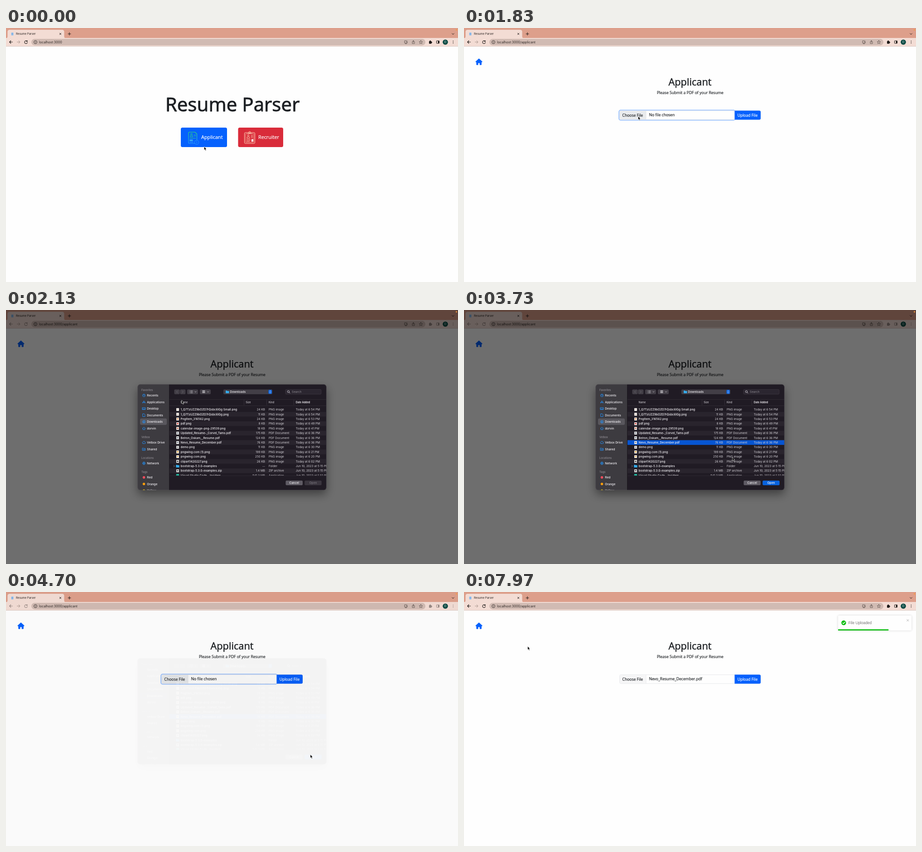
Write an HTML page that moves like this. It is 998 by 561 pixels and loops after 8 s.

```html
<!DOCTYPE html>
<html lang="en">
<head>
<meta charset="utf-8">
<title>Resume Parser</title>
<style>
  html, body { margin: 0; width: 100%; height: 100%; overflow: hidden; background: #fefefe; }
  svg { display: block; width: 100%; height: 100%; }
  text { font-family: Inter, Roboto, sans-serif; white-space: pre; }
  .round { font-family: "Open Sans", "Noto Sans", sans-serif; stroke-width: .022em; stroke-linejoin: round; }
  .round[fill="#1d2024"] { stroke: #1d2024; }
  .round[fill="#fff"] { stroke: #fff; }
  .plain { font-family: "Liberation Sans", Arial, sans-serif; }
  .line { fill: none; stroke-linecap: round; stroke-linejoin: round; }
  .idle { opacity: .42; }
  .resting .tint { fill: #3c3c3e; stroke: #3c3c3e; }
</style>
</head>
<body>
<svg id="stage" viewBox="0 0 998 561" xmlns="http://www.w3.org/2000/svg"></svg>
<script>
const LOOP = 8000;
const INK = '#1d2024', BLUE = '#0561fd', DARK_BLUE = '#0a56d4', RED = '#d92b3a';
const stage = document.getElementById('stage');

// Markup helpers; text is placed by the middle of its capitals.
const text = (x, y, s, size, fill = INK, more = '') =>
  `<text x="${x}" y="${y + size * 0.36}" font-size="${size}" fill="${fill}" ${more}>${s}</text>`;
const rect = (x, y, w, h, fill, r = 0, more = '') =>
  `<rect x="${x}" y="${y}" width="${w}" height="${h}" rx="${r}" fill="${fill}" ${more}/>`;
const circle = (x, y, r, fill, more = '') =>
  `<circle cx="${x}" cy="${y}" r="${r}" fill="${fill}" ${more}/>`;
const line = (d, color, w = 1, more = '') =>
  `<path class="line" d="${d}" stroke="${color}" stroke-width="${w}" ${more}/>`;
const ring = (x, y, r, color, w = 0.8, more = '') =>
  circle(x, y, r, 'none', `stroke="${color}" stroke-width="${w}" ${more}`);
const group = (id, body, more = '') => `<g id="${id}" ${more}>${body}</g>`;
const MID = 'text-anchor="middle"', END = 'text-anchor="end"', MEDIUM = 'font-weight="500"';
const ROUND = 'class="round"', ROUND_MID = `class="round" ${MID}`;

function browser() {
  const k = '#1d1917', soft = '#5b4f4a';
  return rect(0, 0, 998, 23, '#dd9f8b')
    + '<path d="M0 22.5Q3.5 22.5 3.5 18.5V8.5Q3.5 4 8 4H124Q128.5 4 128.5 8.5V18.5Q128.5 22.5 132 22.5Z" fill="#f3dcd4"/>'
    + rect(0, 22, 998, 18.5, '#f3dcd4') + rect(0, 40, 998, 0.8, '#d5c3bc')
    + rect(11.5, 10, 5, 6.5, '#9cc3ec', 1) + line('M12.7 12h2.5M12.7 14h2.5', '#4f8fd6', 0.6)
    + text(22, 13, 'Resume Parser', 6.1, '#2b2422')
    + line('M118.2 11.2l3.6 3.6M121.8 11.2l-3.6 3.6', k, 0.9)
    + line('M137 13h6M140 10v6', k, 1)
    + line('M984.7 12l2.3 2.3l2.3-2.3', k, 1)
    + rect(56, 24, 870, 14.4, '#d1bbb3', 7.2)
    + ring(65, 31.2, 3.5, k, 0.8) + line('M65 31v1.7M65 29.5v.1', k, 0.8)
    + `<text id="url" x="73" y="33.7" font-size="7.2" fill="#2b2422"></text>`
    + line('M883.5 28.2h-3.5v5h6v-1.5M881.5 34.7h3M885 27.8v3.4M883.7 30l1.3 1.3l1.3-1.3', soft, 0.9)
    + line('M898.3 30h-1.3v4.5h5v-4.5h-1.3M899.5 32v-4.5M898.2 28.7l1.3-1.3l1.3 1.3', soft, 0.8)
    + line('M916 27.4l1.1 2.5l2.7.2l-2.1 1.8l.7 2.7l-2.4-1.5l-2.4 1.5l.7-2.7l-2.1-1.8l2.7-.2z', soft, 0.8)
    + group('tools',
        line('M14.3 31H7.8M10.7 28l-3 3l3 3', k, 1.1)
      + line('M46.5 29.2a3.2 3.2 0 1 0 .8 2.5M47 27.7v2h-2', k, 1.1)
      + rect(934, 29, 5.5, 5.7, k, 0.7) + circle(936.7, 28.7, 1.3, k) + circle(939.7, 31.8, 1.3, k)
      + rect(950.5, 28.3, 6, 5.6, 'none', 0.6, `stroke="${k}" stroke-width="1"`) + rect(953.8, 28.3, 2.7, 5.6, k)
      + [28.6, 31.2, 33.8].map(y => circle(987.3, y, 0.75, k)).join(''))
    + line('M24.5 31h6M28 28l3 3l-3 3', '#a8958d', 1)
    + circle(970, 31.2, 5.8, '#0b4b44') + text(970, 31.2, 'D', 5.5, '#e8f1ef', MID);
}

function home() {
  const g = 'url(#mint)', p = '#ffd3b5';
  const portrait = (x, y, c) => ring(x, y, 1.8, c, 0.9) + line(`M${x - 3} ${y + 5.5}q0-3.5 3-3.5t3 3.5z`, c, 0.9);
  return text(500, 168.5, 'Resume Parser', 42.2, INK, ROUND_MID)
    + rect(386, 220, 102, 43, BLUE, 3.5, 'id="apply"')
    + line('M417 255h-12q-2 0-2-2v-21q0-2 2-2h12l4.5 4v13', g, 1.1)
    + portrait(409.5, 234.5, '#2fdc7c') + line('M415.5 236h3.5M415.5 238.5h3.5M406 243.5h13', '#2fc89a', 0.9)
    + rect(405.5, 246.5, 7, 3, '#3db4f5') + line('M406 252h7', '#3db4f5', 0.9)
    + ring(421, 252.5, 4.7, '#2a9dfb', 0.9) + line('M420 250.3l2.2 2.2l-2.2 2.2', '#2a9dfb', 0.9)
    + text(431, 240.8, 'Applicant', 10.9, '#fff', ROUND)
    + rect(512.5, 220, 99.5, 43, RED, 3.5)
    + rect(526.5, 231, 23, 24, 'none', 2, `stroke="${p}" stroke-width="1"`)
    + rect(529, 233.5, 18, 19, 'none', 0.5, `stroke="${p}" stroke-width=".7"`)
    + ring(538, 230.5, 2, p, 0.9) + line('M533.5 233h9', p, 1.2)
    + portrait(535, 237.5, p)
    + line('M541 237h4M541 239.5h4M541 242h4M531.5 246h8M531.5 248.3h8M531.5 250.5h6', p, 0.8)
    + rect(542, 245.5, 4, 5.5, '#fff')
    + text(557, 240.8, 'Recruiter', 10.8, '#fff', ROUND);
}

function applicant() {
  return `<path d="M33 67.3l7.8 7.2l-1 1.1h-1v5.2q0 1-1 1h-3.2v-4.3h-3.2v4.3h-3.2q-1 0-1-1v-5.2h-1l-1-1.1z" fill="${BLUE}"/>`
    + text(499, 119.5, 'Applicant', 21.8, INK, ROUND_MID)
    + text(499.3, 142.7, 'Please Submit a PDF of your Resume', 8.59, INK, ROUND_MID)
    + rect(342.2, 181.6, 256.5, 21.8, 'none', 3.5, 'id="focus" stroke="#9cc3ff" stroke-width="2"')
    + rect(343.5, 182.7, 311.5, 19.6, '#fefefe', 3, 'stroke="#dcdfe3" stroke-width=".7"')
    + '<path id="choose" d="M402 183H346.5q-2.7 0-2.7 2.7v13.6q0 2.7 2.7 2.7H402z"/>'
    + rect(401.7, 183, 0.6, 19, '#dcdfe3')
    + text(349.5, 192.5, 'Choose File', 8.55, INK, ROUND)
    + text(408.5, 192.3, '', 8.55, INK, `id="file" ${ROUND}`)
    + '<path id="upload" d="M597.5 182.5H652q3 0 3 3v14q0 3-3 3H597.5z"/>'
    + text(626, 192.5, 'Upload File', 8.54, '#fff', ROUND_MID);
}

const FILES = [
  ['1_Q7TzUZZ9bOZO7rQsbc6IGg Small.png', '24 KB', '6:54', '#d8c9c0'],
  ['1_Q7TzUZZ9bOZO7rQsbc6IGg.png', '11 KB', '6:54', '#d8c9c0'],
  ['PngItem_316562.png', '24 KB', '6:53', '#d88a4a'],
  ['pdf.png', '8 KB', '6:49', '#d8433c'],
  ['calendar-image-png-29539.png', '18 KB', '6:41', '#c96a4a'],
  ['Updated_Resume-_Corvel_Tams.pdf', '175 KB', '6:36', '#7c8796'],
  ['Belron_Oskam__Resume.pdf', '124 KB', '6:36', '#7c8796'],
  ['Nevo_Resume_December.pdf', '76 KB', '6:36', '#7c8796'],
  ['demo.png', '11 KB', '6:30', '#8d9299'],
  ['pngwing.com (1).png', '199 KB', '6:21', '#e0a030'],
  ['pngwing.com.png', '250 KB', '6:20', '#e8b25a'],
  ['clipart1420227.png', '26 KB', '6:02', '#454545'],
  ['bootstrap-5.3.0-examples', '--', '5:15', 'folder'],
  ['bootstrap-5.3.0-examples.zip', '1.4 MB', '5:15', '#555'],
  ['Visual Studio Code - Insiders', '541.3 MB', '1:32', 'app']
];
const KINDS = { png: 'PNG image', pdf: 'PDF Document', zip: 'ZIP archive' };
const PICK = 7, ROW = 10.4, TOP = 219.9;

const folder = (x, y) => `<path d="M${x - 3.7} ${y - 2.8}h2.8l.8.9h3.8v4.9h-7.4z" fill="#35aef0"/>`;

function fileRow([name, size, time, mark], i) {
  const y = TOP + i * ROW, late = i > 11;
  const kind = mark === 'folder' ? 'Folder' : mark === 'app' ? 'Application' : KINDS[name.split('.').pop()];
  const date = (late ? 'Jun 10, 2023 at ' : 'Today at ') + time + ' PM';
  const icon = mark === 'folder' ? folder(379, y) + line(`M370.3 ${y - 1.8}l1.8 1.8l-1.8 1.8`, '#aaa6ad', 0.8)
    : mark === 'app' ? rect(375.8, y - 3.2, 6.4, 6.4, '#24bfa5', 1)
    : rect(376, y - 3.2, 6, 6.4, '#eeecea', 0.5) + rect(377.3, y - 1.5, 3.4, 2.6, mark, 0.5);
  const faint = '#d3d0d6';
  return (i % 2 ? rect(361, y - ROW / 2, 347, ROW, '#29242d') : '')
    + (i === PICK ? rect(361, y - ROW / 2, 347, ROW, '#0755d1', 0, 'id="pick"') : '')
    + icon + text(385.6, y, name, 6.42, '#f4f2f6', MEDIUM)
    + text(572, y, size, 6.4, faint, END) + text(580, y, kind, 6.4, faint) + text(639.7, y, date, 6.43, faint);
}

function sidebar() {
  const b = '#2295ff';
  const label = (y, s) => text(299, y, s, 5.8, '#8d8a90', MEDIUM);
  const item = (y, s) => text(311.3, y, s, 6.5, '#f4f2f6', MEDIUM);
  const tint = (d, w = 0.9) => line(d, b, w, 'style="fill:none"').replace('class="line"', 'class="line tint"');
  const tags = [['Red', '#ff4d5e'], ['Orange', '#ff9f0a'], ['Yellow', '#ffd60a'], ['Green', '#30d158'], ['Blue', '#0a9bff']];
  return rect(296, 239.5, 59, 14.3, '#59575d', 3)
    + label(177, 'Favorites') + item(188.7, 'Recents') + item(203.2, 'Applications') + item(217.8, 'Desktop')
    + item(232.3, 'Documents') + item(246.9, 'Downloads') + item(261.4, 'dorvin')
    + label(281.2, 'Velbox') + item(292.8, 'Velbox Drive') + item(307.3, 'Shared')
    + tint('M301.5 188.7a3 3 0 1 0 6 0a3 3 0 1 0-6 0M304.5 186.8v2h1.3')
    + tint('M302 206l2.5-5.5l2.5 5.5M301.2 204h6.6')
    + tint('M301.3 215.5h6.4v4.5h-6.4zM301.5 218.5h6')
    + tint('M302.2 229.2h3l1.7 1.7v4.6h-4.7z')
    + tint('M301.5 246.9a3 3 0 1 0 6 0a3 3 0 1 0-6 0M304.5 245.2v3M303.3 247.2l1.2 1.2l1.2-1.2')
    + tint('M301.3 261.5l3.2-2.8l3.2 2.8M302.3 261.2v3h4.4v-3')
    + tint('M302.5 295h4a1.5 1.5 0 0 0 .3-3a2.4 2.4 0 0 0-4.6-.4a1.8 1.8 0 0 0 .3 3.4')
    + tint('M301.5 305h2l.7.8h3.3v4.2h-6zM303 308h3')
    + group('places', label(327, 'Locations') + item(338.6, 'Network')
      + tint('M301.5 338.6a3 3 0 1 0 6 0a3 3 0 1 0-6 0M301.5 338.6h6M304.5 335.6q-2.5 3 0 6q2.5-3 0-6', 0.7))
    + group('tags', label(327, 'Tags')
      + tags.map(([s, c], i) => circle(304.5, 338.6 + i * 14.6, 2.7, c, 'class="tint"') + item(338.6 + i * 14.6, s)).join(''));
}

function dialog() {
  const dim = '#8d8a90', box = '#423e46';
  const down = (x, y) => line(`M${x - 1.5} ${y - 0.7}l1.5 1.5l1.5-1.5`, '#cbc8ce', 0.9);
  const columns = [525.5, 575.5, 635.5].map(x => rect(x, 198, 0.6, 12, '#443f48')).join('');
  return rect(290.5, 173, 417, 234, '#000', 8, 'filter="url(#blur)" opacity=".42"')
    + `<g clip-path="url(#sheet)">`
    + rect(290, 164, 70.5, 235, '#3d3b40') + rect(360.5, 164, 348, 235, '#201b24') + rect(360, 164, 0.7, 235, '#151217')
    + sidebar()
    + rect(371.5, 175.5, 12, 10.5, box, 2) + rect(384.3, 175.5, 12, 10.5, box, 2)
    + line('M378.5 178.8l-1.8 2l1.8 2M389.5 178.8l1.8 2l-1.8 2', '#6f6b74', 0.9)
    + rect(400, 175.5, 24, 10.5, box, 2) + rect(428, 175.5, 24, 10.5, box, 2)
    + line('M407.5 178.5h4.5M407.5 180.8h4.5M407.5 183.1h4.5M405.6 178.5h.1M405.6 180.8h.1M405.6 183.1h.1', '#cbc8ce', 0.8)
    + rect(433.5, 177.8, 6, 2.3, '#bab7bd') + rect(433.5, 181, 6, 2.3, '#bab7bd')
    + down(418.5, 180.8) + down(446, 180.8)
    + rect(480, 175.5, 108, 10.5, box, 2) + folder(488.8, 180.8) + text(494.5, 180.8, 'Downloads', 6.5, '#f4f2f6', MEDIUM)
    + rect(579.5, 176.2, 7.5, 9.1, '#0a62dc', 2)
    + line('M581.9 179.8l1.4-1.5l1.4 1.5M581.9 181.8l1.4 1.5l1.4-1.5', '#fff', 0.8)
    + rect(617, 175.5, 79, 10.5, '#2b2630', 2, 'stroke="#433e47" stroke-width=".6"')
    + ring(623.5, 180.2, 2.2, '#d5d2d8', 0.9) + line('M625.2 181.9l1.9 1.9', '#d5d2d8', 0.9)
    + text(631, 180.8, 'Search', 6.5, dim)
    + rect(361, 197, 347, 0.6, '#39343d') + columns + rect(361, 211, 347, 0.6, '#39343d')
    + text(385.6, 204.2, 'Name', 5.6, '#c5c2c8', MEDIUM) + text(529.3, 204.2, 'Size', 5.6, '#c5c2c8', MEDIUM)
    + text(580, 204.2, 'Kind', 5.6, '#c5c2c8', MEDIUM) + text(639.7, 204.2, 'Date Added', 5.6, '#f2f0f4', 'font-weight="600"')
    + `<g clip-path="url(#list)">${FILES.map(fileRow).join('')}</g>`
    + rect(361, 365.7, 347, 0.6, '#39343d')
    + rect(617.5, 376.7, 37.5, 10.3, '#5f5b64', 2.2) + text(636.2, 381.8, 'Cancel', 6.5, '#f2f0f4', `${MEDIUM} ${MID}`)
    + rect(659.3, 376.7, 37.5, 10.3, '#3a353e', 2.2, 'id="open"')
    + text(678, 381.8, 'Open', 6.5, '#77737b', `id="openText" ${MEDIUM} ${MID}`)
    + '</g>' + rect(290.7, 164.3, 416.7, 233.5, 'none', 6, 'stroke="#58555a" stroke-width=".7"');
}

function toast() {
  const green = '#07bc0c', gray = '#757575';
  return rect(826, 52, 162, 33, '#000', 2, 'filter="url(#soft)" opacity=".16"')
    + rect(826, 52, 162, 33, '#fefefe', 2)
    + group('loading', ring(838.2, 68, 4.8, '#e0e0e0', 1)
      + group('spinner', line('M841.6 64.6a4.8 4.8 0 0 1 0 6.8', '#616161', 1))
      + text(848.7, 68, 'File Uploading...', 8.33, gray, 'class="plain"'))
    + group('done', circle(838.4, 68, 5.2, green) + line('M836 68.2l1.8 1.8l3.3-3.7', '#fff', 1.3)
      + text(848.7, 68, 'File Uploaded', 8.33, gray, 'class="plain"')
      + line('M977.8 60.6l4 4M981.8 60.6l-4 4', '#a8a8a8', 0.9)
      + rect(826, 82.4, 162, 2.6, green, 0, 'id="bar"'));
}

stage.innerHTML = `<defs>
  <linearGradient id="mint" x2="0" y2="1"><stop stop-color="#30e070"/><stop offset="1" stop-color="#2a9dfb"/></linearGradient>
  <filter id="blur" x="-20%" y="-30%" width="140%" height="170%"><feGaussianBlur stdDeviation="10"/></filter>
  <filter id="soft" x="-10%" y="-40%" width="120%" height="180%"><feGaussianBlur stdDeviation="2.5"/></filter>
  <clipPath id="sheet">${rect(290.5, 164, 417, 234, '#000', 6)}</clipPath>
  <clipPath id="list">${rect(361, 212, 347, 153.7, '#000')}</clipPath></defs>`
  + rect(0, 0, 998, 561, '#fefefe') + browser()
  + group('home', home()) + group('applicant', applicant()) + group('toast', toast())
  + rect(0, 0, 998, 561, '#000', 0, 'id="shade"') + group('dialog', dialog())
  + circle(994.5, 4, 1.5, '#f79a3c')
  + group('cursor',
      '<path id="arrow" d="M0 0v7.6l1.7-1.5l1.3 2.9l1.4-.6l-1.3-2.8h2.3z" fill="#000" stroke="#fff" stroke-width=".6" stroke-linejoin="round"/>'
    + '<path id="hand" d="M-.8 .5q.8-1 1.6 0v3l2.9.8q.8.3.7 1.2l-.6 3.5h-4l-2.4-3.3q0-1 1-.7l.8.6z" fill="#000" stroke="#fff" stroke-width=".6"/>');

const el = {};
stage.querySelectorAll('[id]').forEach(n => el[n.id] = n);

const set = (n, o) => { for (const k in o) n.setAttribute(k, o[k]); };
const show = (n, on) => n.setAttribute('display', on ? 'inline' : 'none');
const clamp = u => Math.max(0, Math.min(1, u));
const span = (t, a, b) => clamp((t - a) / (b - a));
const smooth = u => u * u * (3 - 2 * u);
const easeOut = u => 1 - (1 - u) ** 3;
const mix = (a, b, u) => a + (b - a) * u;

// Pointer stops: time, x, y.
const PATH = [
  [0, 437.5, 262], [30, 437.5, 262], [400, 434, 244], [630, 432, 243], [970, 432, 243], [1650, 384.5, 195],
  [2040, 384.5, 195], [2600, 436, 281], [2670, 437, 291], [3370, 437, 291], [3730, 592, 325], [3840, 676.5, 381.5],
  [4570, 677, 382], [4770, 668, 342], [5500, 628, 193], [5670, 628, 193], [6130, 558, 250], [6400, 530, 288],
  [6700, 505, 280], [7270, 424, 234], [7970, 140.5, 120], [8000, 140.5, 120]
];
const slope = (i, c) => (PATH[i + 1][c] - PATH[i][c]) / (PATH[i + 1][0] - PATH[i][0]);
function tangent(i, c) {
  if (i === 0 || i === PATH.length - 1) return 0;
  const a = slope(i - 1, c), b = slope(i, c);
  return a * b <= 0 ? 0 : 2 * a * b / (a + b);
}
function pointer(t) {
  let i = 0;
  while (i < PATH.length - 2 && t >= PATH[i + 1][0]) i++;
  const h = PATH[i + 1][0] - PATH[i][0], u = (t - PATH[i][0]) / h;
  return [1, 2].map(c => mix(PATH[i][c], PATH[i + 1][c], smooth(u))
    + h * u * (1 - u) * ((1 - u) * tangent(i, c) - u * tangent(i + 1, c)));
}

// Bounce from the right: share of the run, offset.
const BOUNCE = [[0, 1560], [0.6, -13], [0.75, 5.2], [0.9, -2.6], [1, 0]];
function bounce(p) {
  let i = 0;
  while (i < BOUNCE.length - 2 && p >= BOUNCE[i + 1][0]) i++;
  const [a, x] = BOUNCE[i], [b, y] = BOUNCE[i + 1];
  return mix(x, y, easeOut(span(p, a, b)));
}

const ENTER = 480, OPEN = 1830, PICKED = 2985, CLOSE = 4440, CLOSED = 4730, SEND = 5666, DONE = 6970;

function draw(t) {
  const [x, y] = pointer(t);
  const over = (l, r, a, b) => x > l && x < r && y > a && y < b;
  const inside = t >= ENTER, sheet = t >= OPEN && t < CLOSED, closing = t >= CLOSE;

  show(el.home, !inside);
  show(el.applicant, inside);
  el.url.textContent = 'localhost:3000' + (inside ? '/applicant' : '');
  const onApply = !inside && over(386, 488, 220, 262);
  set(el.apply, { fill: onApply ? DARK_BLUE : BLUE });
  const onUpload = inside && !sheet && over(598, 655, 182, 203);
  const onChoose = inside && !sheet && over(343, 402, 182, 203);
  set(el.upload, { fill: onUpload || (t > 5500 && t < 6200) ? DARK_BLUE : BLUE });
  set(el.choose, { fill: onChoose || sheet ? '#e9ebed' : '#f6f6f7' });
  show(el.focus, t >= 1760 && t < SEND);
  el.file.textContent = t >= CLOSED ? 'Nevo_Resume_December.pdf' : 'No file chosen';

  const p = closing ? 1 - smooth(span(t, CLOSE, CLOSED)) : smooth(span(t, OPEN, 2030));
  set(el.shade, { opacity: 0.565 * p });
  show(el.dialog, sheet);
  set(el.dialog, {
    transform: `translate(0 ${-18 * (1 - p)})`,
    opacity: Math.min(1, p * (closing ? 1.05 : 2)),
    class: closing ? 'resting' : ''
  });
  set(el.tools, { class: t >= 2030 && t < CLOSED ? 'idle' : '' });
  const placed = t >= 2060, picked = t >= PICKED;
  show(el.places, placed);
  set(el.tags, { transform: `translate(0 ${placed ? 31.1 : 0})` });
  show(el.pick, picked);
  set(el.open, { fill: picked ? '#0963de' : '#3a353e' });
  set(el.openText, { fill: picked ? '#fff' : '#77737b' });

  show(el.toast, t >= SEND);
  set(el.toast, { transform: `translate(${bounce(span(t, SEND, SEND + 700))} 0)` });
  show(el.loading, t < DONE);
  show(el.done, t >= DONE);
  set(el.spinner, { transform: `rotate(${(t - SEND) / 650 * 360} 838.2 68)` });
  set(el.bar, { width: 162 * (1 - span(t, DONE, DONE + 3200)) });

  const hand = onApply || onUpload;
  show(el.hand, hand);
  show(el.arrow, !hand);
  set(el.cursor, { transform: `translate(${x} ${y})` });
}

const start = performance.now();
function tick() {
  draw((performance.now() - start) % LOOP);
  requestAnimationFrame(tick);
}
tick();
</script>
</body>
</html>
```
